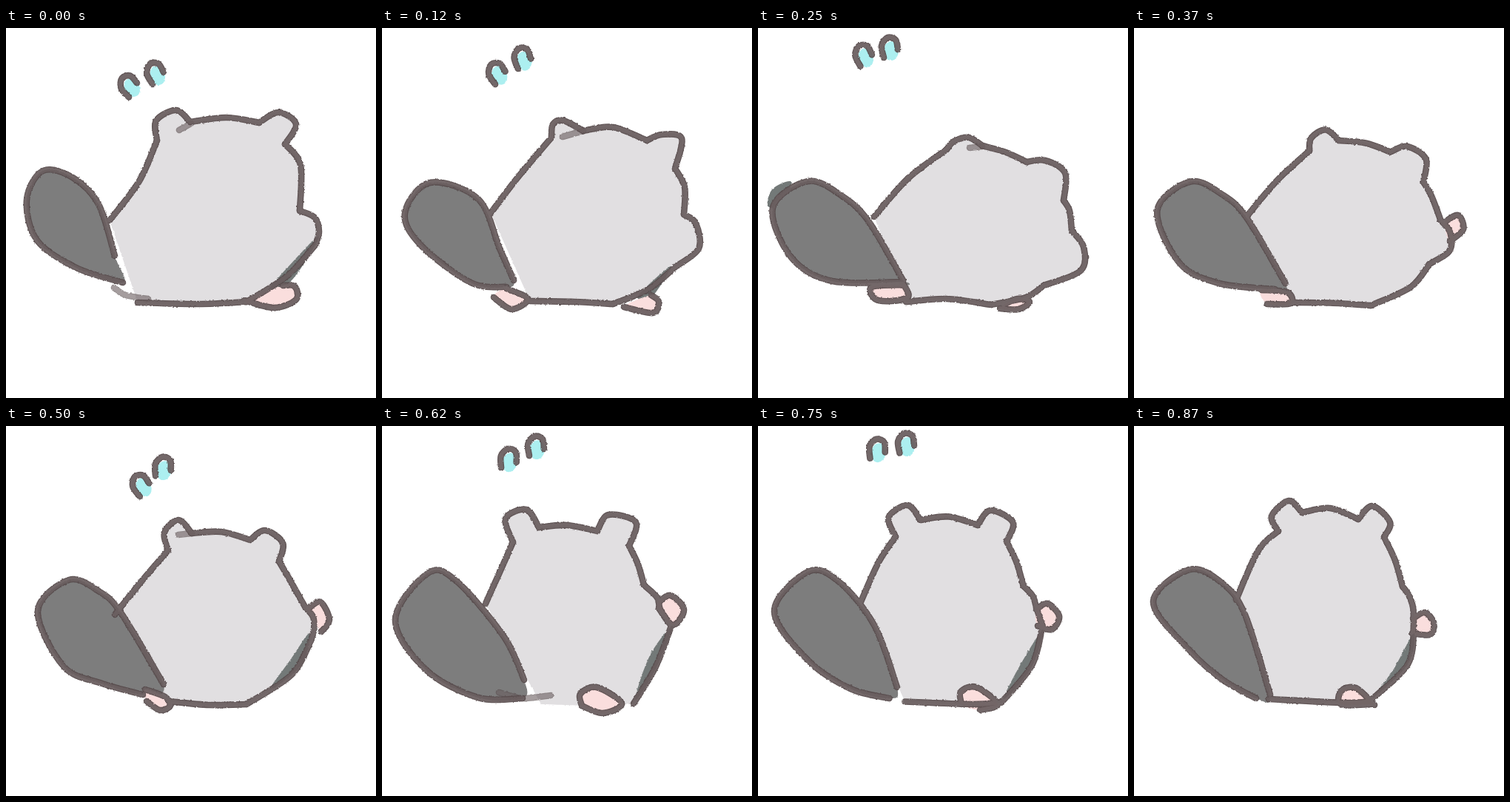
An HTML page that plays this animation: 500x500 px, repeating every 1000 ms.

```html
<!DOCTYPE html>
<html lang="en">
<head>
<meta charset="utf-8">
<title>Beaver wiggle</title>
<style>
  html, body { margin: 0; width: 100%; height: 100%; overflow: hidden; background: #fff; }
  #stage { position: relative; width: 500px; height: 500px; overflow: hidden; }
  #strip { display: block; position: absolute; left: 0; top: 0; animation: strip 1s step-end infinite; }
  @keyframes strip {
    0% { transform: translateX(0); }
    12% { transform: translateX(-500px); }
    25% { transform: translateX(-1000px); }
    37% { transform: translateX(-1500px); }
    50% { transform: translateX(-2000px); }
    62% { transform: translateX(-2500px); }
    75% { transform: translateX(-3000px); }
    87%, 100% { transform: translateX(-3500px); }
  }
  path { fill: none; stroke-linecap: round; stroke-linejoin: round; }
  .body { fill: #e1dfe1; }
  .tail { fill: #7d7d7d; }
  .shade { fill: #737978; }
  .pink { fill: #fadedd; }
  .drop { fill: #aceff0; }
  .edge { stroke: #574b4c; stroke-width: 8.6; }
  .core { stroke: #695d5e; stroke-width: 6; }
  .ink { opacity: .93; }
  .soft { opacity: .6; }
</style>
</head>
<body>
<div id="stage">
  <svg id="strip" width="4000" height="500" viewBox="0 0 4000 500">
    <defs>
      <filter id="rough" filterUnits="userSpaceOnUse" x="0" y="0" width="500" height="500" color-interpolation-filters="sRGB">
        <feTurbulence type="fractalNoise" baseFrequency=".35" numOctaves="2" seed="4"/>
        <feDisplacementMap in="SourceGraphic" scale="2.6" xChannelSelector="R" yChannelSelector="G"/>
      </filter>
    </defs>
  </svg>
</div>
<script>
const NS = 'http://www.w3.org/2000/svg';
const strip = document.getElementById('strip');
let count = 0;

const add = (parent, tag, attrs) => {
  const node = document.createElementNS(NS, tag);
  for (const key in attrs) node.setAttribute(key, attrs[key]);
  return parent.appendChild(node);
};

const points = text => {
  const n = text.split(' ').map(Number);
  return n.filter((_, i) => i % 2 === 0).map((x, i) => [x, n[2 * i + 1]]);
};

const mix = (a, b) => {
  const n = b.split(' ');
  return a.split(' ').map((v, i) => (+v + +n[i]) / 2).join(' ');
};

// Catmull-Rom spline as cubic segments
function curve(pts, closed, start = 'M') {
  const len = pts.length;
  const at = i => pts[closed ? (i + len) % len : Math.max(0, Math.min(len - 1, i))];
  let d = start + pts[0];
  for (let i = 0; i < (closed ? len : len - 1); i++) {
    const [a, b, c, e] = [at(i - 1), at(i), at(i + 1), at(i + 2)];
    const p = b.map((v, k) => v + (c[k] - a[k]) / 6);
    const q = c.map((v, k) => v - (e[k] - b[k]) / 6);
    d += `C${p} ${q} ${c}`;
  }
  return d + (closed ? 'Z' : '');
}

// The body ring runs clockwise from the left ear and has corners at these points.
const corners = [0, 3, 5, 8, 10, 13, 15, 17];
const hook = points('-8 12 -11 -4 -3 -15 8 -12 11 1');

function draw({ ring, tail, limbs, drops = [], shade, soft = [], openBase }) {
  const cell = add(strip, 'svg', { x: 500 * count++, width: 500, height: 500 });
  const art = add(cell, 'g', { filter: 'url(#rough)' });
  const fill = (kind, d) => add(art, 'path', { class: kind, d });
  const body = points(ring);
  const parts = corners.slice(1).map((end, i) => body.slice(corners[i], end + 1));
  parts.push([...body.slice(18), body[0]]);

  fill('body', parts.map((part, i) => curve(part, false, i ? 'L' : 'M')).join('') + 'Z');
  if (shade) fill('shade', curve(points(shade), true));
  fill('tail', curve(points(tail), true));
  for (const limb of limbs) fill('pink', curve(points(limb), true));

  const hooks = drops.map(([x, y, turn]) => {
    add(art, 'ellipse', { class: 'drop', cx: 2, cy: 3, rx: 10, ry: 13, transform: `translate(${x} ${y}) rotate(${turn})` });
    const c = Math.cos(turn * Math.PI / 180), s = Math.sin(turn * Math.PI / 180);
    return hook.map(([u, v]) => [x + u * c - v * s, y + u * s + v * c]);
  });

  const outline = parts.filter((_, i) => !(openBase && i === 6));
  const lines = {
    soft: soft.map(points),
    ink: [...outline, points(tail), ...limbs.map(points), ...hooks]
  };
  for (const kind in lines) {
    const group = add(art, 'g', { class: kind });
    for (const layer of ['edge', 'core'])
      for (const line of lines[kind]) add(group, 'path', { class: layer, d: curve(line) });
  }
}

const upright = {
  ring: '204 152 203 125 230 111 249 127 298 121 342 128 368 114 392 130 377 157 398 185 397 247 417 256 423 275 418 293 380 335 325 370 260 373 178 371 140 260 180 207',
  tail: '147 308 125 238 90 202 50 193 28 232 42 287 95 324 158 344',
  limbs: ['322 368 362 378 392 367 390 349 374 348'],
  drops: [[167, 79, -30], [202, 62, -18]],
  shade: '420 289 385 342 344 366 412 290',
  soft: ['250 129 234 138', '146 351 162 361 192 366']
};

const lean = {
  ring: '229 148 231 130 245 125 272 139 312 134 358 152 378 144 405 149 396 190 409 215 408 252 424 264 428 298 396 323 360 353 312 373 260 370 200 369 147 250 181 205',
  tail: '178 341 159 298 130 231 65 209 31 250 52 293 120 344 168 350',
  limbs: ['168 352 197 366 175 380 151 364', '327 377 366 385 374 370 364 361'],
  drops: [[156, 62, -22], [190, 42, -8]],
  shade: '390 322 346 362 365 363',
  soft: ['244 147 272 139']
};

const stretch = {
  ring: '255 164 265 153 285 148 303 159 335 168 363 181 388 179 415 196 413 233 421 247 424 274 440 296 436 328 386 348 362 364 315 374 255 366 200 370 157 255 203 203',
  tail: '196 341 150 262 115 228 68 207 20 243 45 310 100 342 196 343',
  limbs: ['197 347 154 350 158 366 180 369 203 363 197 347', '327 379 352 380 367 370 350 366 332 374'],
  drops: [[143, 38, -15], [178, 28, 0]],
  shade: '13 240 20 217 45 208 30 240',
  soft: ['286 162 303 160']
};

const turn = {
  ring: '219 168 214 144 233 127 251 145 291 143 330 154 350 141 374 158 369 183 383 207 405 246 415 258 416 275 412 290 386 336 325 376 275 377 220 372 147 255 183 210',
  tail: '213 349 155 252 125 223 85 208 43 250 78 325 130 348 185 363',
  limbs: ['408 247 425 238 437 262 426 278', '188 356 215 366 222 378 208 384 190 372'],
  drops: [[183, 81, -25], [212, 57, 10]],
  shade: '410 280 400 322 357 356 385 315',
  soft: ['233 147 251 145']
};

const wave = {
  ring: '177 157 167 125 195 113 212 137 250 134 291 142 306 120 343 130 334 162 346 187 354 215 372 232 376 248 391 270 370 325 340 375 290 378 215 376 140 240 158 200',
  tail: '192 343 165 285 100 209 62 199 18 262 60 330 130 367 190 368',
  limbs: ['374 238 390 229 408 248 393 269 374 246', '270 378 268 362 290 353 324 375 298 388 270 378'],
  drops: [[171, 46, 10], [208, 29, 5]],
  shade: '393 270 368 332 342 370 362 310',
  soft: ['158 360 190 368 228 364'],
  openBase: true
};

const sit = {
  ring: '195 142 186 122 209 101 227 117 265 111 303 126 322 108 346 130 338 150 353 182 363 217 371 228 377 245 378 270 370 322 318 372 285 374 182 369 138 235 168 168',
  tail: '184 363 150 255 120 213 75 194 26 238 75 303 120 343 165 368',
  limbs: ['377 260 393 252 405 266 400 282 376 280', '320 376 280 376 280 358 300 354 325 377'],
  shade: '378 280 370 322 322 368 350 330'
};

const between = (a, b, extra) => ({ ring: mix(a.ring, b.ring), tail: mix(a.tail, b.tail), ...extra });

const reach = between(stretch, turn, {
  limbs: ['420 262 438 253 445 272 427 288', '172 354 207 357 212 372 180 373']
});

const settle = between(wave, sit, {
  limbs: ['376 248 391 240 407 257 397 275 378 270', '275 376 274 359 295 353 324 376 300 384'],
  drops: [[161, 33, 8], [200, 25, 3]],
  shade: mix(wave.shade, sit.shade)
});

[upright, lean, stretch, reach, turn, wave, settle, sit].forEach(draw);
</script>
</body>
</html>
```
